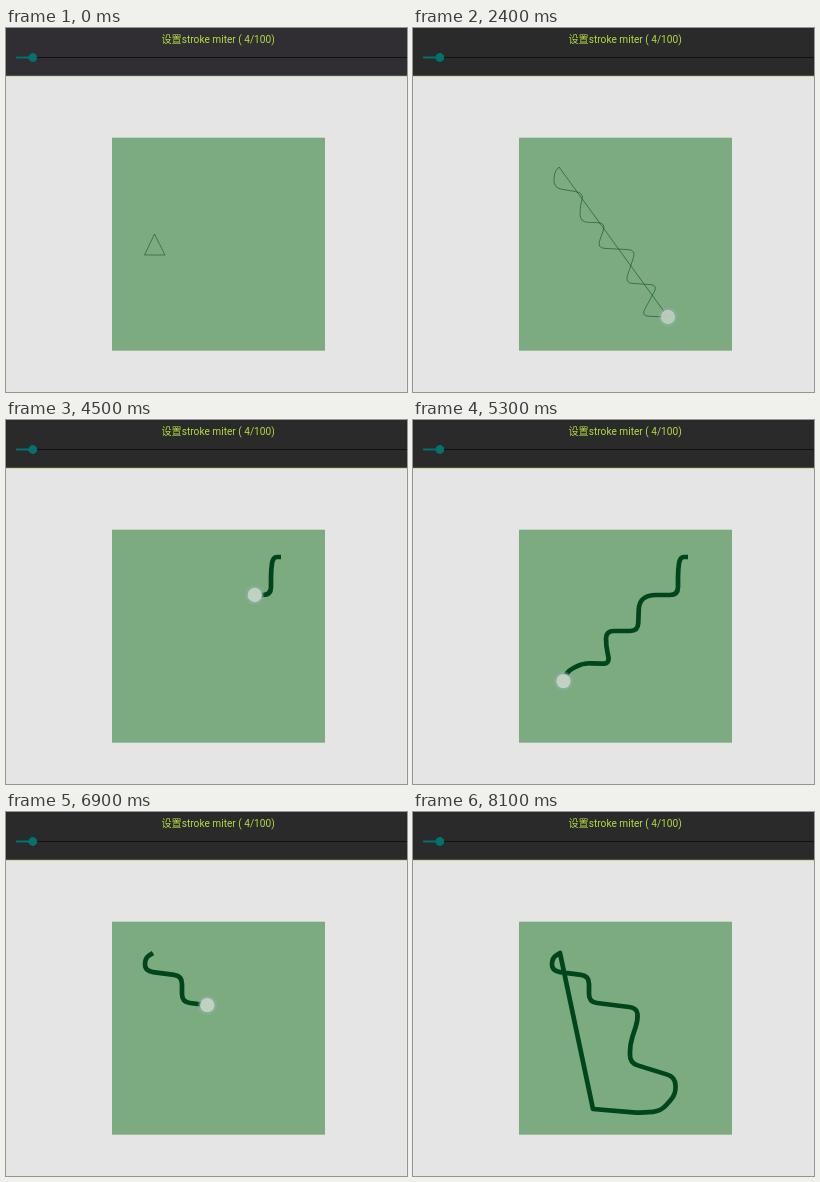
An HTML page for the animation above (8.6 s loop, 401 px wide and 364 px high).

```html
<!DOCTYPE html>
<html lang="zh">
<head>
<meta charset="utf-8">
<title>Stroke miter</title>
<style>
  html, body { margin: 0; width: 100%; height: 100%; overflow: hidden; background: #e5e5e5; }
  svg { display: block; width: 401px; height: 364px; }
  text { font: 10.15px Roboto, "Noto Sans CJK SC", "Noto Sans CJK", sans-serif; fill: #b2dc42; }
  #ink, #triangle { fill: none; stroke: #00461c; stroke-linejoin: round; }
</style>
</head>
<body>
<svg viewBox="0 0 401 364">
  <rect width="401" height="364" fill="#e5e5e5"/>
  <rect id="bar" width="401" height="48" fill="#2a2a2a"/>
  <rect y="47.8" width="401" height=".9" fill="#c3d68c"/>
  <text x="155.5" y="15.2">设置stroke miter ( 4/100)</text>
  <rect x="10" y="29" width="391" height="1" fill="#101010"/>
  <rect x="10" y="28.5" width="17" height="2" fill="#04716f"/>
  <circle cx="26.8" cy="29.5" r="4.4" fill="#04716f"/>
  <rect x="106" y="109.7" width="213" height="213" fill="#7dab80"/>
  <path id="triangle" d="M148.5 206 L138.5 227 H159 Z" stroke-width=".7" stroke-opacity=".75"/>
  <path id="ink"/>
  <g id="touch">
    <circle r="9.5" fill="#9dbcb8" fill-opacity=".3"/>
    <circle r="8.2" fill="#7fa6a6" fill-opacity=".6"/>
    <circle r="7.2" fill="#c2d0c2"/>
  </g>
</svg>
<script>
const LOOP = 8600, STEP = 100, ROUNDING = 8;
const THIN = .55, THICK = 4.7;
const $ = id => document.getElementById(id);
const clamp = v => Math.max(0, Math.min(1, v));

// A finger draws along rounded corners from start to end; the shape then closes and the finger lifts
const strokes = [
  {
    start: 600, end: 2300, lift: 2600, ease: 1,
    corners: '146,139 141,145 141,160 171,165 167,178 167,194 193,195 184,220 223,222 212,255 245,257 228,288 255,289'
  },
  {
    start: 4100, end: 5800, lift: 6000, ease: 1.22,
    corners: '275,137 267,137 265,150 265,175 235,175 226,182 225,211 193,211 193,226 197,244 170,243 153,252 148,270 155,288 180,295 244,290'
  },
  {
    start: 6400, end: 8000, lift: 8100, ease: 1,
    corners: '147,141 139,146 139,159 176,164 176,190 224,196 225,208 217,232 217,251 262,265 263,282 248,299 228,301 180,297'
  }
];

// Point at most ROUNDING away from a, never past the middle of a-b
function toward(a, b) {
  const k = Math.min(.5, ROUNDING / Math.hypot(b[0] - a[0], b[1] - a[1]));
  return [a[0] + (b[0] - a[0]) * k, a[1] + (b[1] - a[1]) * k];
}

function roundedLine(text) {
  const p = text.split(' ').map(s => s.split(',').map(Number));
  let d = 'M' + p[0];
  for (let i = 1; i < p.length - 1; i++) {
    d += `L${toward(p[i], p[i - 1])}Q${p[i]} ${toward(p[i], p[i + 1])}`;
  }
  return d + 'L' + p[p.length - 1];
}

for (const s of strokes) {
  s.d = roundedLine(s.corners);
  s.path = document.createElementNS('http://www.w3.org/2000/svg', 'path');
  s.path.setAttribute('d', s.d);
  s.length = s.path.getTotalLength();
}

const ink = $('ink'), touch = $('touch');

function draw(t) {
  const s = strokes.filter(k => t >= k.start).pop();
  $('bar').setAttribute('fill', s ? '#2a2a2a' : '#302e33');
  $('triangle').style.display = s ? 'none' : '';
  ink.style.display = touch.style.display = s ? '' : 'none';
  if (!s) return;

  const closed = t > s.end;
  const len = s.length * clamp((t - s.start) / (s.end - s.start)) ** s.ease;
  ink.setAttribute('d', closed ? s.d + 'Z' : s.d);
  ink.setAttribute('stroke-dasharray', closed ? 'none' : `${len} 9999`);
  ink.setAttribute('stroke-width', THIN + (THICK - THIN) * clamp((t - 2900) / 800));

  const at = s.path.getPointAtLength(len);
  touch.setAttribute('transform', `translate(${at.x} ${at.y})`);
  touch.setAttribute('opacity', 1 - clamp((t - s.end) / (s.lift - s.end)) ** 2);
}

const start = performance.now();
function tick() {
  const t = (performance.now() - start) % LOOP;
  draw(Math.floor(t / STEP) * STEP);
  requestAnimationFrame(tick);
}
tick();
</script>
</body>
</html>
```
